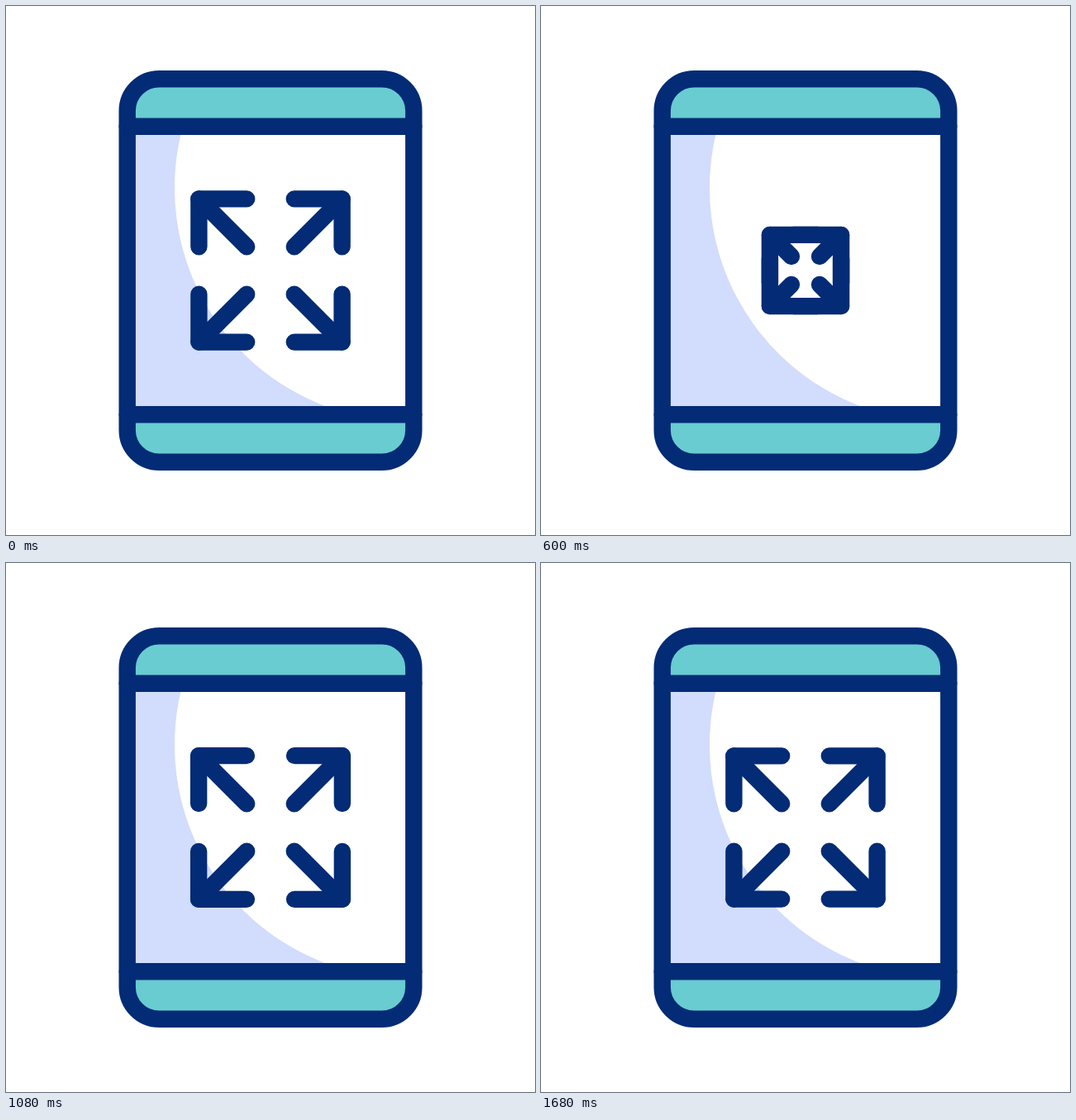
An HTML page that plays this animation: 640x640 px, repeating every 2.4 s.

```html
<!DOCTYPE html>
<html lang="en">
<head>
<meta charset="utf-8">
<title>Expand screen</title>
<style>
  @property --head { syntax: "<length>"; inherits: true; initial-value: 0px; }
  @property --tail { syntax: "<length>"; inherits: true; initial-value: 0px; }

  html, body { margin: 0; width: 100%; height: 100%; overflow: hidden; background: #fff; }

  svg {
    --navy: #042b76;
    --smooth: cubic-bezier(.333, 0, .667, 1);
    display: block;
    animation: head 2400ms infinite, tail 2400ms infinite;
    animation-timing-function: var(--smooth);
  }

  .line {
    fill: none;
    stroke: var(--navy);
    stroke-width: 20.4px;
    stroke-linecap: round;
    stroke-linejoin: round;
  }

  .tip { transform: translate(var(--head), var(--head)); }

  /* Spans the diagonal from the arrow tip to its inner end. */
  .shaft {
    fill: var(--navy);
    x: calc(1.4142 * (var(--head) - 86.6px) - 10.2px);
    y: -10.2px;
    width: calc(1.4142 * (57.8px + var(--tail) - var(--head)) + 20.4px);
    height: 20.4px;
    rx: 10.2px;
  }

  /* Pull in with acceleration, then spring out and settle. */
  @keyframes head {
    0% { --head: 0px; }
    8.75% { --head: 0px; animation-timing-function: cubic-bezier(.333, 0, .667, .333); }
    25% { --head: 43.5px; }
    35.83% { --head: -8px; }
    51.25% { --head: 4px; }
    63.75% { --head: -2px; }
    70.4%, 100% { --head: 0px; }
  }

  @keyframes tail {
    0%, 8.33% { --tail: 0px; }
    22.5% { --tail: 13px; }
    35.83%, 100% { --tail: 0px; }
  }
</style>
</head>
<body>
<svg width="640" height="640" viewBox="0 0 640 640">
  <defs>
    <g id="arrow">
      <path class="line tip" d="M-28.8-86.6H-86.6V-28.8"/>
      <g transform="rotate(45)"><rect class="shaft"/></g>
    </g>
  </defs>

  <rect x="146.7" y="88.2" width="346.6" height="463.6" rx="38.6" fill="#68ccd1"/>
  <rect x="146.7" y="145.7" width="346.6" height="348.6" fill="#fff"/>
  <path d="M147 156H211.3A282.5 282.5 0 0 0 386 484V490H147Z" fill="#d2dcfd"/>
  <rect class="line" x="146.7" y="88.2" width="346.6" height="463.6" rx="38.6"/>
  <path class="line" d="M146.7 145.7H493.3M146.7 494.3H493.3"/>

  <g transform="translate(320 320)">
    <use href="#arrow"/>
    <use href="#arrow" transform="rotate(90)"/>
    <use href="#arrow" transform="rotate(180)"/>
    <use href="#arrow" transform="rotate(270)"/>
  </g>
</svg>
</body>
</html>
```
